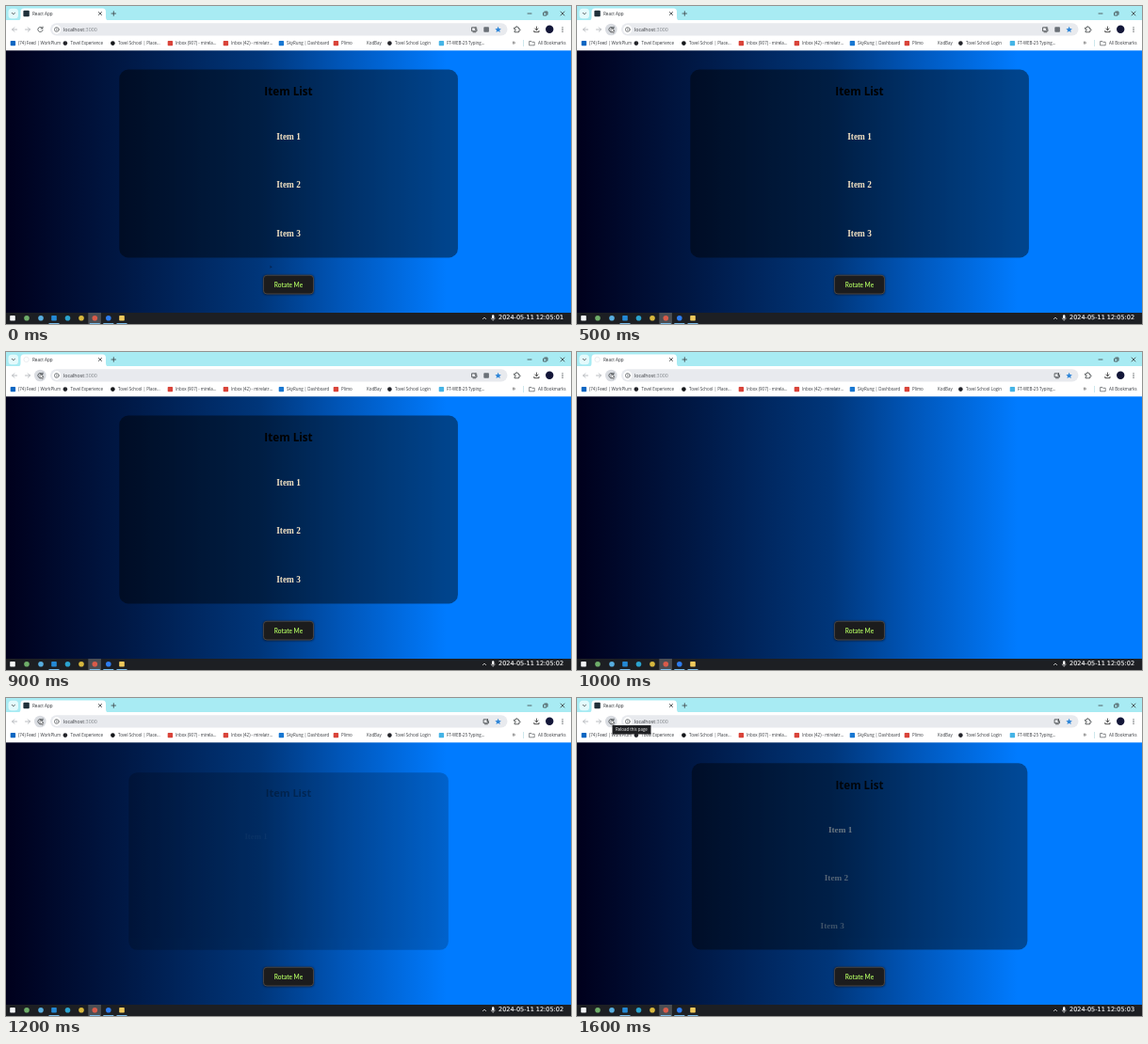
Recreate the animation shown at these times as an HTML page. Size 600 by 338 pixels, loop 1.7 s.

```html
<!DOCTYPE html>
<html lang="en">
<head>
<meta charset="utf-8">
<title>Item list</title>
<style>
html, body { margin: 0; width: 100%; height: 100%; overflow: hidden; background: #00001c; }
svg { display: block; width: 100vw; height: 100vh; }
text { font-family: "Open Sans", "Noto Sans", sans-serif; white-space: pre; }
.mark { font-size: 4.45px; fill: #33363b; }
.line { fill: none; stroke: #3c4043; stroke-width: .8; stroke-linecap: round; stroke-linejoin: round; }
.item { font: bold 9.3px "Liberation Serif", serif; fill: #f5e3c4; text-anchor: middle; }
</style>
</head>
<body>
<svg viewBox="0 0 600 338" preserveAspectRatio="none">
  <defs>
    <linearGradient id="sky">
      <stop offset="0" stop-color="#00001c"/>
      <stop offset=".2" stop-color="#001743"/>
      <stop offset=".45" stop-color="#00367a"/>
      <stop offset=".6" stop-color="#0057bb"/>
      <stop offset=".78" stop-color="#007bff"/>
    </linearGradient>
    <filter id="soft" x="-20%" y="-40%" width="140%" height="180%"><feGaussianBlur stdDeviation="1.2"/></filter>
  </defs>

  <rect y="47" width="600" height="279" fill="url(#sky)"/>

  <g id="panel">
    <rect x="120.3" y="67.6" width="359.6" height="199.8" rx="9.5" fill="#000" fill-opacity=".45"/>
    <text x="300" y="95.4" font-size="11.7" font-weight="700" text-anchor="middle">Item List</text>
    <g id="items"></g>
  </g>

  <rect x="273" y="286" width="54" height="21" rx="4" fill="#000" opacity=".6" filter="url(#soft)"/>
  <rect x="273.4" y="286.2" width="53.2" height="19.8" rx="3.6" fill="#1c1c1d" stroke="#514b48" stroke-width=".9"/>
  <text x="300" y="298.5" text-anchor="middle" fill="#a4e65c" style="font:bold 6.5px Lato,sans-serif">Rotate Me</text>
  <path id="speck" d="M280.5 275.5v3.4l1-.9 1.3.1z" fill="#06152f" opacity=".6"/>

  <!-- browser -->
  <rect width="600" height="16" fill="#a8ebf3"/>
  <rect y="15" width="600" height="32.3" fill="#fff"/>
  <rect x="2.5" y="2.8" width="10.5" height="10.5" rx="3.5" fill="#e4fafc"/>
  <path class="line" d="M6.3 7.3 7.9 8.8 9.5 7.3"/>
  <path d="M12 15.5q3.5 0 3.5-3.5V6q0-3.5 3.5-3.5h83.5q3.5 0 3.5 3.5v6q0 3.5 3.5 3.5z" fill="#fff"/>
  <rect id="favicon" x="18.4" y="4.8" width="6.4" height="6.4" rx="1" fill="#20303a"/>
  <g id="spinner"><circle cx="21.6" cy="8" r="2.7" fill="none" stroke="#e3e6ea" stroke-width=".7"/></g>
  <text x="28" y="9.8" font-size="4.6" fill="#2b2e33">React App</text>
  <path class="line" d="M98.4 6.4l3.2 3.2m0-3.2-3.2 3.2M112 8h4.6m-2.3-2.3v4.6"/>
  <path class="line" stroke-width=".6" d="M554 8h4m13-1h3v3h-3zm1-1h3v3M589 6l4 4m0-4-4 4"/>

  <path class="line" style="stroke:#a9adb2" d="M11.6 25H6.6m2.2-2.2L6.6 25l2.2 2.2M20.5 25h5m-2.2-2.2 2.2 2.2-2.2 2.2"/>
  <circle id="hover" cx="36.3" cy="25" r="6.3" fill="#d9dce1"/>
  <path class="line" d="M38.7 23.6A2.6 2.6 0 1 0 39 25.6M39 22v1.9h-1.9"/>
  <path id="arrow" d="M36.2 23.2v5l1.2-1.1.9 1.8.9-.4-.8-1.8h1.7z" fill="#fff" stroke="#222" stroke-width=".45"/>

  <rect x="47" y="18.2" width="485.5" height="13.2" rx="6.6" fill="#e8eaee"/>
  <circle cx="53.8" cy="25" r="4.7" fill="#fff"/>
  <circle class="line" cx="53.8" cy="25" r="2.4" style="stroke-width:.6"/>
  <path class="line" style="stroke-width:.6" d="M53.8 24.8v1.3m0-2.5v.1"/>
  <text x="61" y="27" font-size="5.3" fill="#35383d">localhost<tspan fill="#80858b">:3000</tspan></text>
  <g id="install"><path class="line" d="M499 22.8h-4.4v3.9h5.4v-1.2m-4 2.3h2.8m.2-5.2v2.5m-1.1-1 1.1 1.1 1.1-1.1"/></g>
  <g id="translate"><rect x="507.3" y="22.2" width="5.6" height="5.6" rx=".8" fill="#6a7077"/></g>
  <path d="M522.6 21.8l.95 2.1 2.3.25-1.7 1.55.5 2.3-2.05-1.2-2.05 1.2.5-2.3-1.7-1.55 2.3-.25z" fill="#2f86d8"/>
  <path class="line" d="M540 23h1.6q-.3-1.4.8-1.4t.8 1.4h1.5v1.6q1.4-.3 1.4.8t-1.4.8v1.6H540v-1.5q1.3 0 1.3-.9t-1.3-.9z"/>
  <path class="line" style="stroke:#222" d="M563.4 22v3.5m-1.7-1.5 1.7 1.7 1.7-1.7M560.8 26.4v1.3h5.2v-1.3"/>
  <circle cx="577.2" cy="24.8" r="4.2" fill="#131638"/>
  <g fill="#3c4043"><circle cx="591" cy="22.8" r=".65"/><circle cx="591" cy="25" r=".65"/><circle cx="591" cy="27.2" r=".65"/></g>

  <g id="marks"></g>
  <text x="537.5" y="41.4" font-size="7" fill="#333">»</text>
  <path d="M549.5 36v7" stroke="#b9dfe6" stroke-width=".7"/>
  <path class="line" style="stroke-width:.6" d="M556 37.5h1.9l.7.8h2.6v3.5H556z"/>
  <text class="mark" x="565" y="41.2">All Bookmarks</text>

  <g id="tip">
    <rect x="37.5" y="29" width="41" height="9.5" fill="#202124"/>
    <text x="41" y="35.3" font-size="4.4" fill="#eee">Reload this page</text>
  </g>

  <!-- taskbar -->
  <rect y="326" width="600" height="12" fill="#1d1f23"/>
  <rect x="87.3" y="326" width="13.6" height="12" fill="#4b4e53"/>
  <g id="apps"></g>
  <path d="M506 333l2-2 2 2" fill="none" stroke="#eee" stroke-width=".7"/>
  <rect x="516" y="328.3" width="2.4" height="4.2" rx="1.2" fill="#fff"/>
  <path d="M515.2 331.5q0 2 2 2t2-2m-2 2v1.3" fill="none" stroke="#fff" stroke-width=".5"/>
  <text id="clock" x="523" y="333.4" fill="#fff" stroke="#fff" stroke-width=".12" style="font:6.5px 'DejaVu Sans',sans-serif"></text>
</svg>
<script>
const LOOP = 1700;
const $ = id => document.getElementById(id);
const show = (id, on) => $(id).setAttribute("visibility", on ? "visible" : "hidden");
const clamp = v => Math.max(0, Math.min(1, v));

const square = (x, y, s, fill) =>
  `<rect x="${x - s / 2}" y="${y - s / 2}" width="${s}" height="${s}" rx=".8" fill="${fill}"/>`;
const dot = (x, y, s, fill) => `<circle cx="${x}" cy="${y}" r="${s / 2}" fill="${fill}"/>`;

// bookmark: text x, label, icon shape, icon colour
$("marks").innerHTML = [
  [13, "(74) Feed | WorkPlum", square, "#0a66c2"],
  [68.5, "Tovel Experience", dot, "#23242a"],
  [119, "Tovel School | Place...", dot, "#15171a"],
  [180, "Inbox (907) - mirela...", square, "#d9443a"],
  [239, "Inbox (42) - mirelatr...", square, "#d9443a"],
  [298, "SkyRung | Dashboard", square, "#1877d2"],
  [356, "Plimo", square, "#d9443a"],
  [383, "KodBay"],
  [413, "Tovel School Login", dot, "#23242a"],
  [468, "FT-WEB-25 Typing...", square, "#45b4e6"]
].map(([x, label, shape, fill]) =>
  (shape ? shape(x - 5.6, 39.6, shape === dot ? 4.6 : 5.4, fill) : "") +
  `<text class="mark" x="${x}" y="41.2">${label}</text>`).join("");

// taskbar app: x, icon shape, colour, running
$("apps").innerHTML = [
  [7, square, "#f4f6f8"],
  [22, dot, "#6fae6a"],
  [37, dot, "#58aee0"],
  [51, square, "#2489d6", 1],
  [65.5, dot, "#2ba3cf"],
  [80, dot, "#d8b83e"],
  [94.3, dot, "#d95b4a", 1],
  [108.8, dot, "#2d7df0", 1],
  [123, square, "#f0c95c", 1]
].map(([x, shape, fill, open]) => shape(x, 331.8, 5.6, fill) +
  (open ? `<rect x="${x - 5.5}" y="337" width="11" height="1" fill="#78b9e6"/>` : "")).join("");

$("items").innerHTML = [1, 2, 3].map(n =>
  `<text class="item" x="300" y="${91 + 51.2 * n}">Item ${n}</text>`).join("");
const items = [...$("items").children];

function draw(t) {
  const fresh = t >= 995;
  // what is left of the panel's entrance, 1 to 0
  const rest = fresh ? Math.exp(-Math.max(0, t - 1077) / 213) : 0;
  const scale = 1 - .1 * rest;
  $("panel").setAttribute("opacity", 1 - rest);
  $("panel").setAttribute("transform",
    `translate(300 ${167.5 + 10.7 * rest}) scale(${scale}) translate(-300 -167.5)`);
  items.forEach((el, i) => {
    const p = fresh ? clamp((t - 1115 - 105 * i) / 1000) : 1;
    el.setAttribute("opacity", p);
    el.setAttribute("transform", `translate(${-40 * (1 - p)} 0)`);
  });

  const loading = t >= 700 && t < 1100;
  show("favicon", !loading);
  show("spinner", loading);
  show("speck", t < 100);
  show("hover", t >= 400);
  show("arrow", t >= 400);
  show("install", !fresh);
  show("translate", !fresh);
  if (fresh) show("install", true);
  $("install").setAttribute("transform", fresh ? "translate(12.5 0)" : "");
  show("tip", t >= 1395);
  $("clock").textContent = "2024-05-11 12:05:0" + (t < 300 ? 1 : t < 1300 ? 2 : 3);
}

const start = performance.now();
function tick() {
  draw((performance.now() - start) % LOOP);
  requestAnimationFrame(tick);
}
tick();
</script>
</body>
</html>
```
